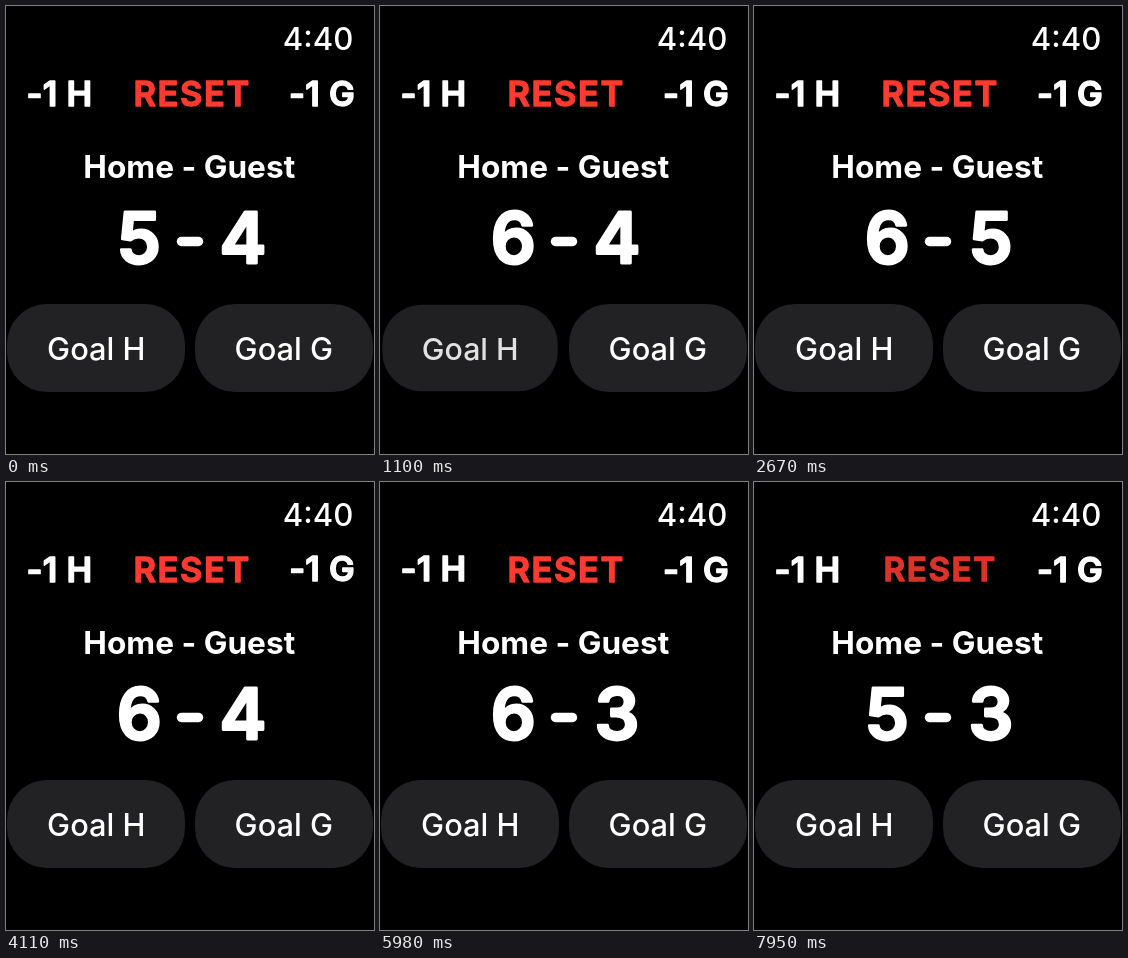
Write an HTML page with a canvas that moves like this. It is 368 by 448 pixels and loops after 8 s.

```html
<!DOCTYPE html>
<html lang="en">
<head>
<meta charset="utf-8">
<title>Score keeper</title>
<style>
  html, body { margin: 0; width: 100%; height: 100%; overflow: hidden; background: #000; }
  canvas { display: block; width: 368px; height: 448px; }
</style>
</head>
<body>
<canvas id="stage" width="368" height="448"></canvas>
<script>
const ctx = document.getElementById('stage').getContext('2d');
const LOOP = 8000, PEAK = 370, RELEASE = 400;
const FAMILY = 'Inter, Roboto, sans-serif';
const WHITE = [255, 255, 255], GREY = [155, 155, 158];
const RED = [255, 59, 48], DARK_RED = [205, 47, 38];

// Each tap: start time, control, which score it changes and by how much.
const taps = [
  { at: 500, id: 'goalH', side: 0, add: 1, span: 880 },
  { at: 1790, id: 'goalG', side: 1, add: 1, span: 880 },
  { at: 3270, id: 'minusG', side: 1, add: -1, span: 960 },
  { at: 4400, id: 'minusG', side: 1, add: -1, span: 960 },
  { at: 5980, id: 'minusH', side: 0, add: -1, span: 940 },
  { at: 7720, id: 'reset', side: 0, add: 0, span: 940 }
];

const mix = (a, b, k) => `rgb(${a.map((v, i) => Math.round(v + (b[i] - v) * k)).join(',')})`;

function pressDepth(id, t) {
  let depth = 0;
  for (const tap of taps) {
    const age = t - tap.at;
    if (tap.id !== id || age <= 0 || age >= tap.span) continue;
    depth = age < PEAK
      ? Math.sin(age / PEAK * Math.PI / 2) ** 2
      : (1 - (age - PEAK) / (tap.span - PEAK)) ** 2;
  }
  return depth;
}

function scoreAt(t) {
  const score = [5, 4];
  for (const tap of taps) if (t >= tap.at + RELEASE) score[tap.side] += tap.add;
  return score;
}

// Text centred on its visible ink; a round outline softens the corners.
function label(text, cx, baseline, weight, size, color, outline = 0, spacing = 0) {
  ctx.font = `${weight} ${size}px ${FAMILY}`;
  ctx.letterSpacing = `${spacing}px`;
  const m = ctx.measureText(text);
  const x = cx - (m.actualBoundingBoxRight - m.actualBoundingBoxLeft) / 2;
  ctx.fillStyle = ctx.strokeStyle = color;
  ctx.fillText(text, x, baseline);
  if (outline) {
    ctx.lineWidth = outline;
    ctx.strokeText(text, x, baseline);
  }
}

function shrunk(cx, cy, depth, paint) {
  const s = 1 - 0.05 * depth;
  ctx.save();
  ctx.translate(cx, cy);
  ctx.scale(s, s);
  ctx.translate(-cx, -cy);
  paint();
  ctx.restore();
}

function topButton(id, text, cx, base, dim, t, spacing) {
  const d = pressDepth(id, t);
  shrunk(cx, 87, d, () => label(text, cx, 99.5, 600, 34.4, mix(base, dim, d), 1.4, spacing));
}

function goalButton(id, text, x, t) {
  const d = pressDepth(id, t), cx = x + 89;
  shrunk(cx, 342, d, () => {
    ctx.fillStyle = mix([34, 34, 36], [26, 26, 28], d);
    ctx.beginPath();
    ctx.roundRect(x, 298, 178, 88, 40);
    ctx.fill();
    label(text, cx - 0.2, 354.3, 500, 30.8, mix(WHITE, GREY, d));
  });
}

function draw(t) {
  ctx.fillStyle = '#000';
  ctx.fillRect(0, 0, 368, 448);
  ctx.lineJoin = ctx.lineCap = 'round';
  const white = mix(WHITE, WHITE, 0);

  label('4:40', 312, 44, 500, 31.2, white);
  topButton('minusH', '-1 H', 53.5, WHITE, GREY, t, 0.2);
  topButton('reset', 'RESET', 186, RED, DARK_RED, t, 1.6);
  topButton('minusG', '-1 G', 316, WHITE, GREY, t, 0.2);

  label('Home - Guest', 184, 172, 700, 31.6, white);

  const [home, guest] = scoreAt(t);
  label(String(home), 133.3, 256.5, 600, 70.5, white, 2.8);
  label(String(guest), 237, 256.5, 600, 70.5, white, 2.8);
  ctx.lineWidth = 9.5;
  ctx.beginPath();
  ctx.moveTo(175.5, 235.5);
  ctx.lineTo(192.5, 235.5);
  ctx.stroke();

  goalButton('goalH', 'Goal H', 1, t);
  goalButton('goalG', 'Goal G', 189, t);
}

const start = performance.now();
function tick() {
  draw((performance.now() - start) % LOOP);
  requestAnimationFrame(tick);
}
tick();
</script>
</body>
</html>
```
